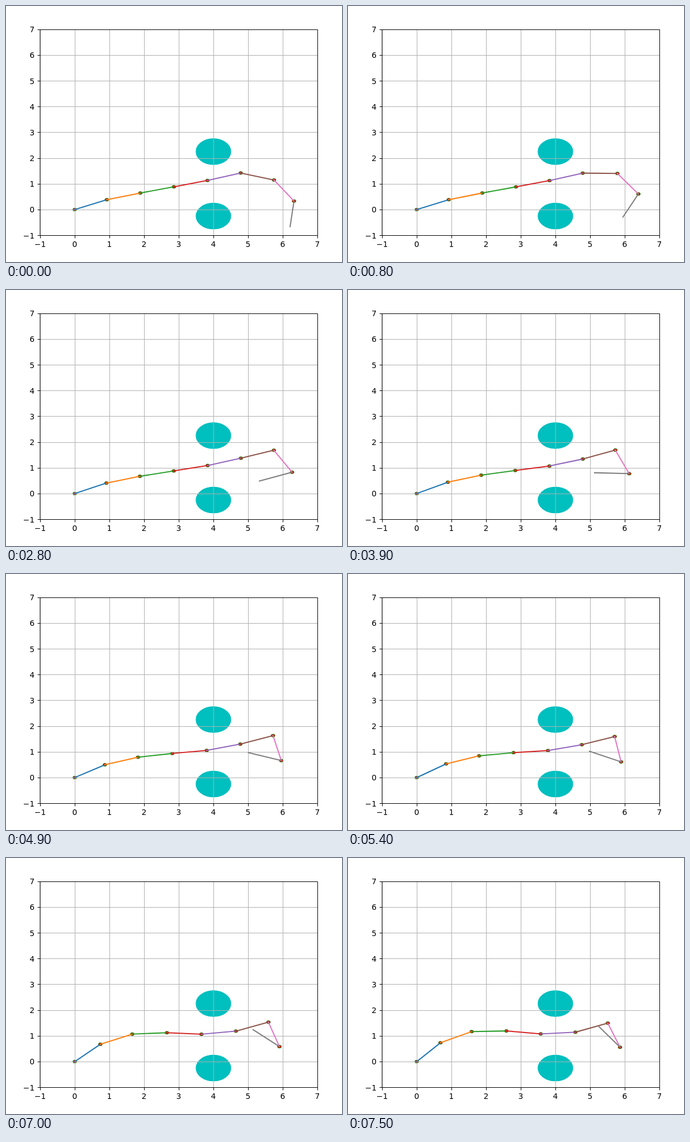
Write an HTML page that moves like this. It is 601x459 px and loops after 8000 ms.

```html
<!DOCTYPE html>
<html lang="en">
<head>
<meta charset="utf-8">
<title>Robot arm between two obstacles</title>
<style>
  html, body { margin: 0; width: 100%; height: 100%; overflow: hidden; background: #fff; }
  svg { display: block; }
  text { font: 13.89px "DejaVu Sans", sans-serif; }
</style>
</head>
<body>
<svg id="plot" width="601" height="459" viewBox="0 0 601 459"></svg>
<script>
const plot = document.getElementById('plot');
const LOOP = 8000, LAST_STEP = 15;
const COLORS = ['#1f77b4', '#ff7f0e', '#2ca02c', '#d62728', '#9467bd', '#8c564b', '#e377c2', '#7f7f7f'];

// Links near the base drift slowly: start angle, total turn, power of the ease
const DRIFTS = [[22.5, 24.4, 3], [15, 10.7, 4], [14, -12.6, 2], [14.3, -20.9, 2.5], [16.8, -13, 4]];

// The last three links swing: step, then their directions in degrees
const SWING = [
  [0, -15.8, -54.8, -96.5],
  [4, 11.9, -52.6, -137],
  [8, 20.4, -66.4, -182.1],
  [11, 18.5, -79.3, -204.3],
  [13, 19.9, -73.7, -210.8],
  [15, 20.6, -69.3, -232.7]
];

const px = x => 123 + 62 * x;
const py = y => 365 - 46.198 * y;
const crisp = v => Math.round(v) + 0.5;

function add(tag, attrs, label) {
  const el = document.createElementNS('http://www.w3.org/2000/svg', tag);
  for (const name in attrs) el.setAttribute(name, attrs[name]);
  if (label) el.textContent = label;
  return plot.appendChild(el);
}

const path = (d, stroke, width, cap = 'square') =>
  add('path', { d, stroke, 'stroke-width': width, fill: 'none', 'stroke-linecap': cap });

const disc = (x, y, r, fill, stroke, width) =>
  add('ellipse', { cx: px(x), cy: py(y), rx: 62 * r, ry: 46.198 * r, fill, stroke, 'stroke-width': width });

for (const y of [2.25, -0.25]) disc(4, y, 0.5, '#00bfbf', '#00bfbf', 1.39);
const dots = COLORS.map(() => disc(0, 0, 0.056, '#f00', '#008000', 1));

const left = crisp(px(-1)), right = crisp(px(7));
const ceiling = crisp(py(7)), floor = crisp(py(-1));
let grid = '', ticks = '';
for (let n = -1; n <= 7; n++) {
  const x = crisp(px(n)), y = crisp(py(n));
  const label = String(n).replace('-', '\u2212');
  grid += `M${x} ${ceiling}V${floor}M${left} ${y}H${right}`;
  ticks += `M${x} ${floor}v5M${left} ${y}h-5`;
  add('text', { x: px(n), y: 432, 'text-anchor': 'middle' }, label);
  add('text', { x: 51, y: Math.round(py(n) + 5.495), 'text-anchor': 'end' }, label);
}
path(grid, '#b0b0b0', 1, 'butt');
path(ticks, '#000', 1, 'butt');
const links = COLORS.map(color => path('', color, 2.08));
path(`M${left} ${ceiling}H${right}V${floor}H${left}Z`, '#000', 1);

// Smooth cubic curve through one column of the swing poses
function swing(step, col) {
  const last = SWING.length - 1;
  let i = 0;
  while (i < last - 1 && SWING[i + 1][0] <= step) i++;
  const slope = k => {
    const a = SWING[Math.max(k - 1, 0)], b = SWING[Math.min(k + 1, last)];
    return (b[col] - a[col]) / (b[0] - a[0]);
  };
  const a = SWING[i], b = SWING[i + 1], span = b[0] - a[0];
  const t = (step - a[0]) / span, u = 1 - t;
  return u * u * (1 + 2 * t) * a[col] + t * t * (3 - 2 * t) * b[col]
    + span * t * u * (u * slope(i) - t * slope(i + 1));
}

function angleAt(step, i) {
  if (i >= DRIFTS.length) return swing(step, i - DRIFTS.length + 1);
  const [start, turn, power] = DRIFTS[i];
  return start + turn * (step / LAST_STEP) ** power;
}

function pose(step) {
  let x = 0, y = 0;
  links.forEach((link, i) => {
    const angle = angleAt(step, i) * Math.PI / 180;
    const from = `${px(x)} ${py(y)}`;
    dots[i].setAttribute('cx', px(x));
    dots[i].setAttribute('cy', py(y));
    x += Math.cos(angle);
    y += Math.sin(angle);
    link.setAttribute('d', `M${from}L${px(x)} ${py(y)}`);
  });
}

// A step lasts about 515 ms and becomes visible on a 100 ms clock
function stepAt(time) {
  const tick = 100 * Math.floor(time / 100) + 100;
  return Math.max(0, Math.ceil((tick - 303) / 515.5));
}

function frame() {
  pose(stepAt(performance.now() % LOOP));
  requestAnimationFrame(frame);
}
frame();
</script>
</body>
</html>
```
